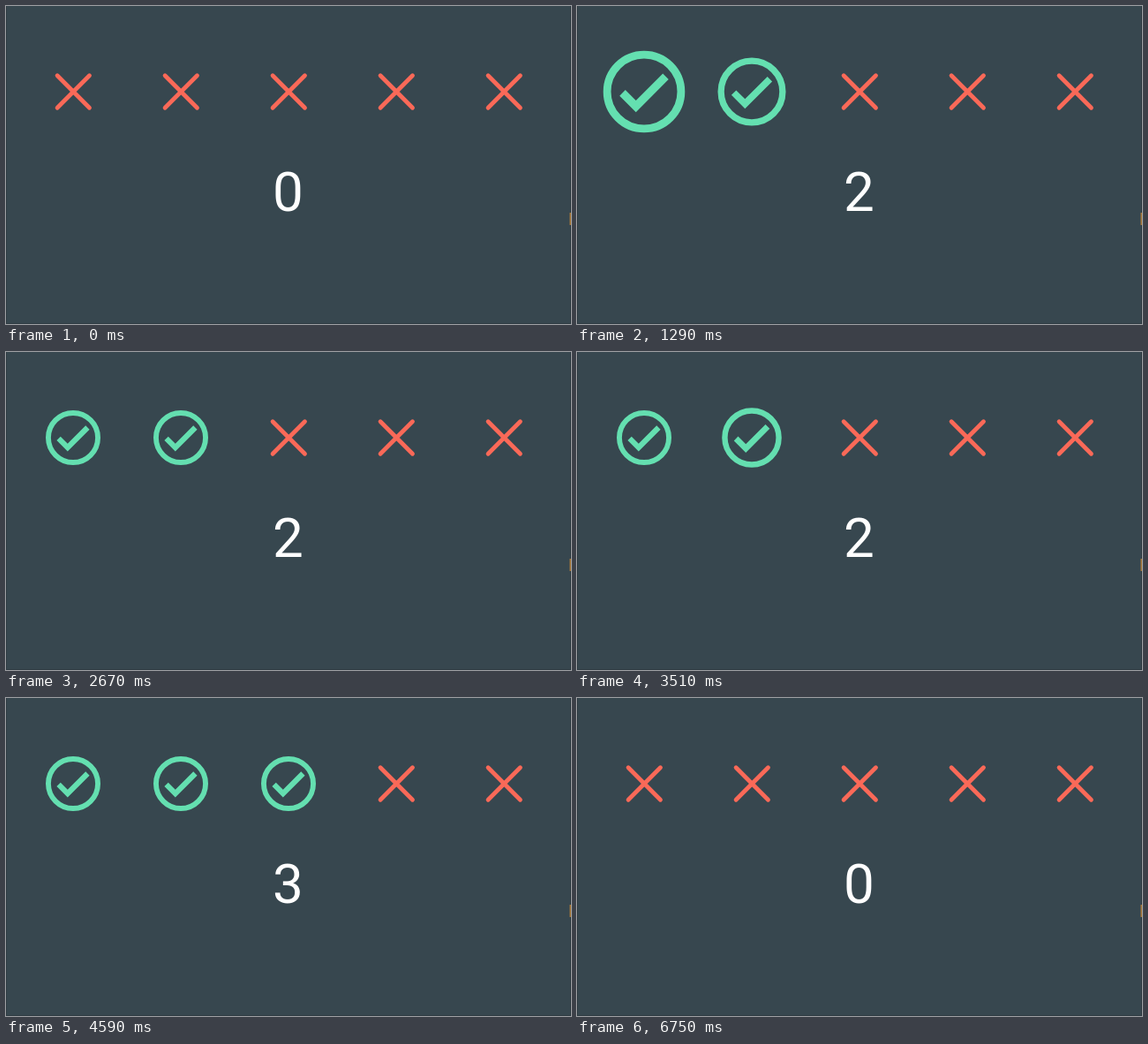
These frames come from a looping animation (640x360 px, 6780 ms). An HTML page with a canvas:

```html
<!DOCTYPE html>
<html lang="en">
<head>
<meta charset="utf-8">
<title>Check counter</title>
<style>
html, body { margin: 0; width: 100%; height: 100%; overflow: hidden; background: #37474f; }
canvas { display: block; width: 640px; height: 360px; }
</style>
</head>
<body>
<canvas id="stage" width="640" height="360"></canvas>
<script>
const ctx = document.getElementById('stage').getContext('2d');
const LOOP = 6780;
const POP_UP = 200, POP_DOWN = 200, POP_SCALE = 0.5;
const UNIT = 3.1;

// [time, count]: a rise sets off a pop on the newly checked icon
const steps = [
  [0, 0],
  [1094, 1], [1194, 2], [1294, 3], [1394, 4], [1494, 5],
  [2250, 4], [2450, 3], [2650, 2], [2780, 1],
  [3475, 2], [3575, 3], [3675, 4], [3775, 5],
  [4300, 4], [4480, 3], [4880, 2], [5250, 1],
  [6000, 0]
];

function stateAt(t) {
  let count = 0;
  const since = Array(5).fill(-Infinity);
  for (const [time, value] of steps) {
    if (time > t) break;
    if (value > count) since[value - 1] = time;
    count = value;
  }
  return { count, since };
}

function popScale(age) {
  if (age < POP_UP) return 1 + POP_SCALE * age / POP_UP;
  return 1 + POP_SCALE * Math.max(0, 1 - (age - POP_UP) / POP_DOWN);
}

function drawCheck(x, y, scale) {
  const k = UNIT * scale;
  ctx.save();
  ctx.translate(x, y);
  ctx.scale(k, k);
  ctx.strokeStyle = ctx.fillStyle = '#64dfb0';
  ctx.lineWidth = 1.9;
  ctx.beginPath();
  ctx.arc(0, 0, 9.05, 0, Math.PI * 2);
  ctx.stroke();
  ctx.beginPath();
  ctx.moveTo(4.59, -4.42);
  ctx.lineTo(-2, 2.17);
  ctx.lineTo(-4.59, -0.41);
  ctx.lineTo(-6, 1);
  ctx.lineTo(-2, 5);
  ctx.lineTo(6, -3);
  ctx.fill();
  ctx.restore();
}

function drawCross(x, y) {
  const r = 18.2;
  ctx.strokeStyle = '#fa6958';
  ctx.lineWidth = 4.8;
  ctx.lineCap = 'round';
  ctx.beginPath();
  ctx.moveTo(x - r, y - r);
  ctx.lineTo(x + r, y + r);
  ctx.moveTo(x + r, y - r);
  ctx.lineTo(x - r, y + r);
  ctx.stroke();
}

function drawBackdrop() {
  ctx.fillStyle = '#37474f';
  ctx.fillRect(0, 0, 640, 360);
  ctx.fillStyle = '#2f3c43';
  ctx.fillRect(0, 0, 1, 360);
  ctx.fillRect(639, 0, 1, 360);
  ctx.fillRect(0, 359, 640, 1);
  ctx.fillStyle = '#a97a3c';
  ctx.fillRect(638.5, 234, 1.5, 14);
}

function draw(t) {
  const { count, since } = stateAt(t);
  drawBackdrop();
  for (let i = 0; i < 5; i++) {
    const x = 76 + 122 * i;
    if (i < count) drawCheck(x, 97, popScale(t - since[i]));
    else drawCross(x + 0.3, 97);
  }
  ctx.fillStyle = '#fff';
  ctx.font = '400 62px Roboto, sans-serif';
  ctx.textAlign = 'center';
  ctx.fillText(count, 319.5, 232);
}

const start = performance.now();
function frame() {
  draw((performance.now() - start) % LOOP);
  requestAnimationFrame(frame);
}
frame();
</script>
</body>
</html>
```
